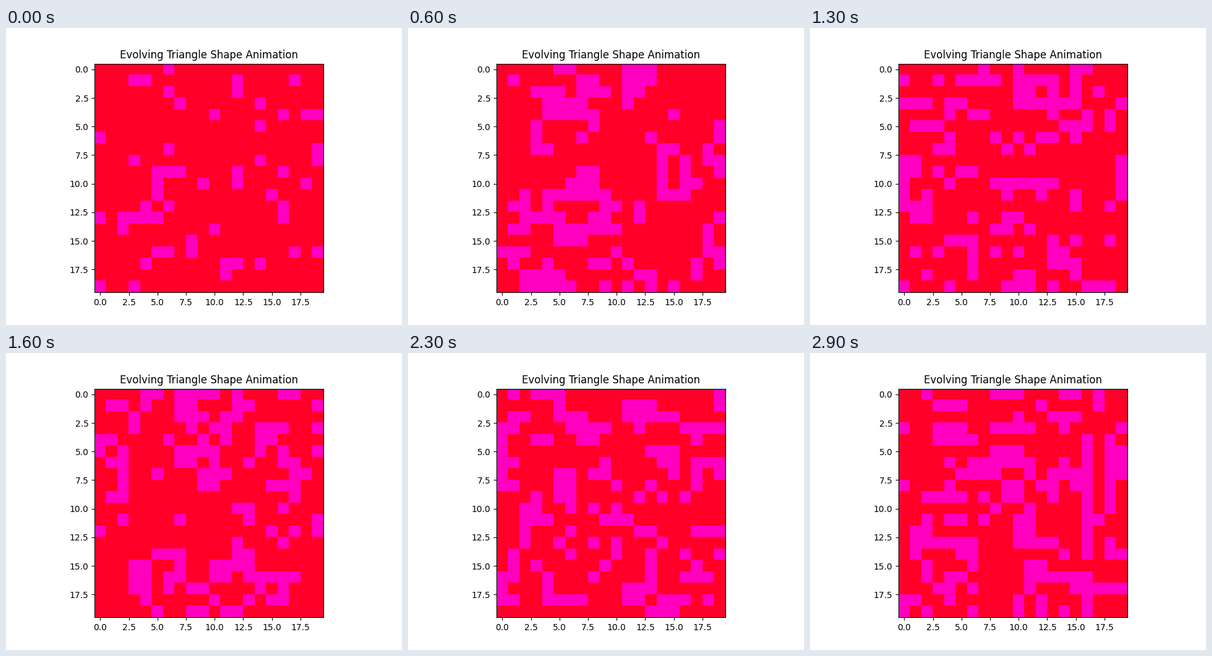
A matplotlib script for the animation above (3000 ms loop, 640x480 px).

```python
import numpy as np
import matplotlib.pyplot as plt
from matplotlib.animation import FuncAnimation

SIZE = 20
FRAMES = 30
INTERVAL = 100
START_SHARE = 0.135
SPARK_SHARE = 0.06

rng = np.random.default_rng(7)


def sprinkle(share):
    return rng.random((SIZE, SIZE)) < share


def evolve(grid):
    """One step of Life on a wrapped grid, with a few cells lit at random."""
    around = sum(
        np.roll(grid, (dy, dx), axis=(0, 1)).astype(int)
        for dy in (-1, 0, 1) for dx in (-1, 0, 1) if dy or dx
    )
    return (around == 3) | (grid & (around == 2)) | sprinkle(SPARK_SHARE)


grids = [sprinkle(START_SHARE)]
while len(grids) < FRAMES:
    grids.append(evolve(grids[-1]))

plt.rcParams["font.family"] = "DejaVu Sans"
fig, ax = plt.subplots(figsize=(6.4, 4.8), dpi=100)
image = ax.imshow(grids[0].astype(int), cmap="gist_rainbow", vmin=0, vmax=1,
                  interpolation="nearest")
ax.set_title("Evolving Triangle Shape Animation")


def update(frame):
    image.set_data(grids[frame].astype(int))
    return [image]


anim = FuncAnimation(fig, update, frames=FRAMES, interval=INTERVAL,
                     init_func=lambda: update(0), repeat=True,
                     repeat_delay=0)
plt.show()
```
